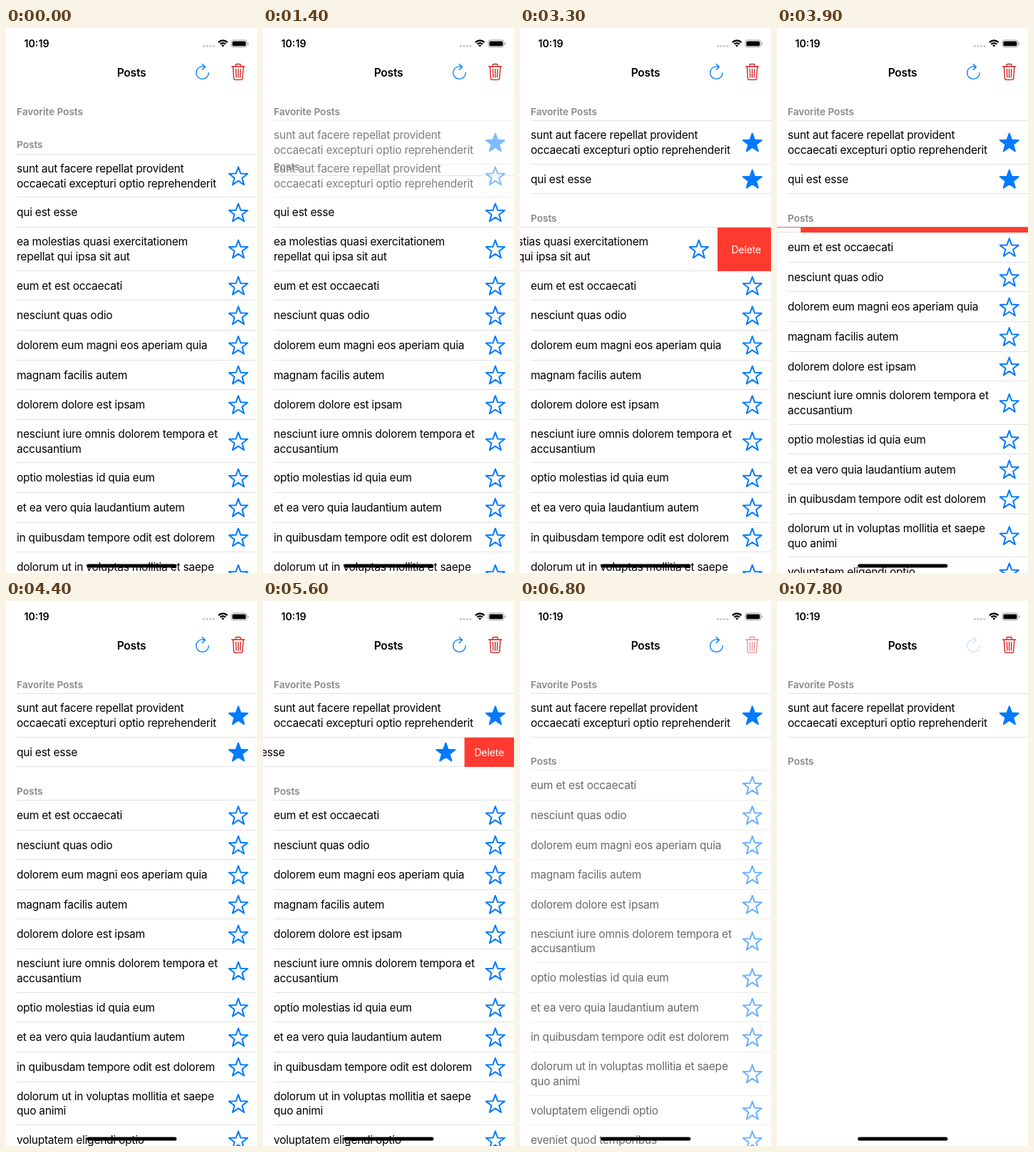
Write an HTML page that moves like this. It is 352 by 762 pixels and loops after 8000 ms.

```html
<!DOCTYPE html>
<html lang="en">
<head>
<meta charset="utf-8">
<title>Posts</title>
<style>
  html, body { margin: 0; width: 100%; height: 100%; overflow: hidden; background: #fff; }
  #stage { display: block; width: 352px; height: 762px; font-family: Inter, "Liberation Sans", sans-serif; }
  .item { font-size: 15.5px; letter-spacing: -.235px; }
  .title { font-size: 15.5px; font-weight: 600; letter-spacing: -.2px; text-anchor: middle; }
  .head { font-size: 13.7px; font-weight: 600; letter-spacing: -.05px; fill: #8a8a8e; }
  .clock { font-size: 14.2px; font-weight: 600; }
  .delete { font-size: 14px; letter-spacing: -.12px; fill: #fff; text-anchor: middle; }
  .sep { fill: #e2e2e4; }
  .star { stroke: #007aff; stroke-width: 2; stroke-linejoin: round; }
  .icon { fill: none; stroke-width: 1.35; stroke-linecap: round; stroke-linejoin: round; }
</style>
</head>
<body>
<svg id="stage" viewBox="0 0 352 762">
  <g id="seps"></g>
  <g id="rows"></g>
  <rect id="seam" x="0" width="352" height="1" fill="#d4605a" opacity=".9"/>
  <text class="head" x="15" y="121.5">Favorite Posts</text>
  <text class="head" id="postsHead" x="15">Posts</text>

  <text class="clock" x="25.5" y="26.6">10:19</text>
  <g fill="#c4c4c6">
    <circle cx="277.4" cy="25.2" r="1.5"/><circle cx="281.9" cy="25.2" r="1.5"/>
    <circle cx="286.4" cy="25.2" r="1.5"/><circle cx="290.9" cy="25.2" r="1.5"/>
  </g>
  <g id="wifi" fill="none" stroke="#000" stroke-width="2.3"></g>
  <rect x="315.9" y="16.9" width="22" height="9.8" rx="2.8" fill="none" stroke="#a2a2a4"/>
  <rect x="317.4" y="18.4" width="19" height="6.8" rx="1.5"/>
  <path d="M339 20.2q1.5.5 1.5 1.6t-1.5 1.6z" fill="#a2a2a4"/>

  <text class="title" x="176" y="67.6">Posts</text>
  <g id="refresh" class="icon" stroke="#007aff">
    <path d="M284.2 62.6A8.8 8.8 0 1 1 275.4 53.8Q277.4 53.8 279.2 54.5M275.2 50.4L279.3 54.5L275.2 58.6"/>
  </g>
  <g id="trash" class="icon" stroke="#d1201f">
    <path d="M316.6 54H334.6M322 53.8V52.2Q322 50.5 323.7 50.5H327.5Q329.2 50.5 329.2 52.2V53.8"/>
    <path d="M318.4 54.2L319.4 70.3Q319.6 72.4 321.6 72.4H329.6Q331.6 72.4 331.8 70.3L332.8 54.2"/>
    <path d="M322.4 57.5L322.8 69M325.6 57.5V69M328.8 57.5L328.4 69"/>
  </g>
  <rect x="113.3" y="749.5" width="126" height="5" rx="2.5"/>
</svg>
<script>
const LOOP = 8000, TICK = 100;
const ONE = 41.6, TWO = 60.7, TOP = 129.6, GAP = 46.9, BUTTON = 69.5;
const POSTS = [
  "sunt aut facere repellat provident|occaecati excepturi optio reprehenderit",
  "qui est esse",
  "ea molestias quasi exercitationem|repellat qui ipsa sit aut",
  "eum et est occaecati",
  "nesciunt quas odio",
  "dolorem eum magni eos aperiam quia",
  "magnam facilis autem",
  "dolorem dolore est ipsam",
  "nesciunt iure omnis dolorem tempora et|accusantium",
  "optio molestias id quia eum",
  "et ea vero quia laudantium autem",
  "in quibusdam tempore odit est dolorem",
  "dolorum ut in voluptas mollitia et saepe|quo animi",
  "voluptatem eligendi optio",
  "eveniet quod temporibus"
];

const $ = id => document.getElementById(id);

function set(el, attrs) {
  for (const k in attrs) el.setAttribute(k, attrs[k]);
  return el;
}

function add(parent, tag, attrs, text) {
  const el = set(document.createElementNS("http://www.w3.org/2000/svg", tag), attrs);
  if (text) el.textContent = text;
  return parent.appendChild(el);
}

// Pixel row of the hairline at a row edge
const snap = y => Math.floor(y - .3);

function ease(t, start, span) {
  const x = Math.min(1, Math.max(0, (t - start) / span));
  return x * x * (3 - 2 * x);
}

// Drag past the button width, then settle back
const DRAG = [0, 6, 25, 48, 66, 75, 72.5, 70.5, BUTTON];
function drag(t, start) {
  const i = Math.round((t - start) / TICK);
  return i < 0 ? 0 : DRAG[Math.min(i, DRAG.length - 1)];
}

function starPoints(cx, cy) {
  return Array.from({ length: 10 }, (_, i) => {
    const a = i * Math.PI / 5, r = i % 2 ? 5.6 : 13.7;
    return (cx + r * Math.sin(a)).toFixed(2) + "," + (cy - r * Math.cos(a)).toFixed(2);
  }).join(" ");
}

function makeSep() {
  return add($("seps"), "rect", { class: "sep", height: 1, width: 352 });
}

function makeRow(text, filled) {
  const lines = text.split("|"), h = lines.length > 1 ? TWO : ONE;
  const box = add($("rows"), "svg", { x: 0, width: 352 });
  const body = add(box, "g", {});
  const first = lines.length > 1 ? 25.5 : 26.3;
  lines.forEach((s, i) => add(body, "text", { class: "item", x: 15, y: first + i * 20.65 }, s));
  add(body, "polygon", {
    class: "star", points: starPoints(325.8, h / 2 + 1.2), fill: filled ? "#007aff" : "none"
  });
  const red = add(box, "rect", { y: 0, height: 80, fill: "#ff3b30" });
  const label = add(box, "text", { class: "delete", y: h / 2 + 5.2 }, "Delete");
  return { box, body, red, label, h, sep: makeSep() };
}

function place(row, top, height, opacity = 1, off = 0) {
  const y = snap(top) + 1, end = snap(top + height);
  const display = opacity > 0 && end >= y ? "inline" : "none";
  set(row.box, { y, height: Math.max(0, end + 1 - y), opacity, display });
  set(row.body, { transform: `translate(${-off} ${top - y})` });
  set(row.red, { x: 352 - off, width: off });
  set(row.label, { x: 352 - Math.min(off, BUTTON) + BUTTON / 2, display: off ? "inline" : "none" });
  set(row.sep, { x: off ? 0 : 15, y: end, opacity, display });
}

const favTop = makeSep(), listTop = makeSep();
const favs = POSTS.slice(0, 2).map(s => makeRow(s, true));
const list = POSTS.map(s => makeRow(s, false));

for (const r of [8.9, 5.3, 1.5]) {
  const d = r * Math.SQRT1_2;
  add($("wifi"), "path", {
    d: `M${304.2 - d} ${26.4 - d}A${r} ${r} 0 0 1 ${304.2 + d} ${26.4 - d}`,
    "stroke-width": r < 2 ? 3 : 2.3
  });
}

function render(t) {
  const like = [ease(t, 1200, 400), ease(t, 1900, 400)];
  const cut1 = 3617, cut2 = 5740, cutSpan = 360;
  const del1 = ease(t, cut1, cutSpan), del2 = ease(t, cut2, cutSpan);
  const off1 = drag(t, 2800) + (352 - BUTTON) * del1;
  const off2 = drag(t, 4800) + (352 - BUTTON) * del2;
  const clear = 1 - ease(t, 6600, 450);

  // Favorites
  const favMid = TOP + TWO * like[0];
  const favEnd = favMid + ONE * like[1] * (1 - del2);
  set(favTop, { x: 15, y: snap(TOP), opacity: like[0] });
  place(favs[0], TOP, TWO, like[0]);
  place(favs[1], TOP + TWO, ONE * (1 - del2), like[1], off2);
  if (off2 && del2 < 1) set(favs[0].sep, { x: 0 });

  // Posts
  let y = favEnd + GAP;
  set($("postsHead"), { y: y - 8.1 });
  set(listTop, { x: off1 && del1 < 1 ? 0 : 15, y: snap(y), opacity: clear });
  list.forEach((row, i) => {
    if (i < 2) {
      // A liked row fades where it stands while the header slides over it
      y += row.h * (1 - like[i]);
      place(row, y - row.h, row.h, 1 - like[i]);
    } else {
      const h = i === 2 ? row.h * (1 - del1) : row.h;
      place(row, y, h, clear, i === 2 ? off1 : 0);
      y += h;
    }
  });

  const closing = cut => t > cut && t < cut + 450;
  set($("seam"), {
    y: closing(cut2) ? snap(favMid) : snap(favEnd + GAP),
    display: closing(cut1) || closing(cut2) ? "inline" : "none"
  });
  set($("trash"), { opacity: t < 6700 ? 1 : .3 + .7 * ease(t, 6700, 300) });
  set($("refresh"), { opacity: t < 7800 ? 1 : .2 });
}

const begin = performance.now();
function frame() {
  const t = (performance.now() - begin) % LOOP;
  render(Math.floor(t / TICK) * TICK);
  requestAnimationFrame(frame);
}
frame();
</script>
</body>
</html>
```
